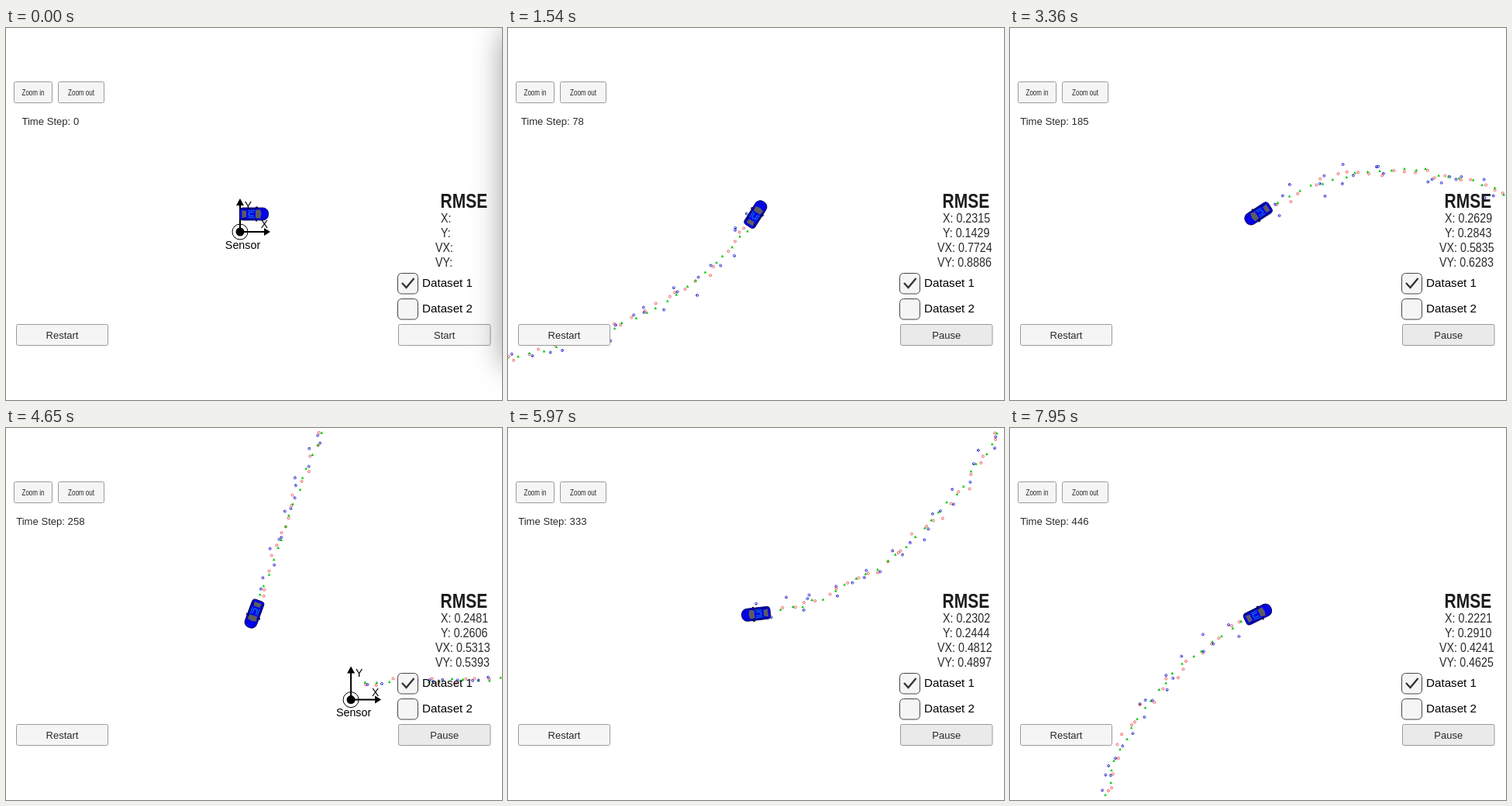
Write an HTML page with a canvas that moves like this. It is 640x480 px and loops after 7.99 s.

```html
<!DOCTYPE html>
<html lang="en">
<head>
<meta charset="utf-8">
<title>Sensor fusion simulator</title>
<style>
html, body { margin: 0; width: 100%; height: 100%; overflow: hidden; background: #fff; }
canvas { display: block; width: 640px; height: 480px; }
</style>
</head>
<body>
<canvas id="stage" width="640" height="480"></canvas>
<script>
const ctx = document.getElementById("stage").getContext("2d");
const LOOP = 7990, BEGIN = 140, TICK = 40.6;
const SCALE = 31, DT = 0.05, STEPS = 460;
const CX = 320, CY = 240;

// Readings along the run: time in ms, step, RMSE of x, y, vx, vy
const KEYS = [
  [140, 0, 0, 0, 0, 0],
  [1540, 78, 0.2315, 0.1429, 0.7724, 0.8886],
  [3360, 185, 0.2629, 0.2843, 0.5835, 0.6283],
  [4650, 258, 0.2481, 0.2606, 0.5313, 0.5393],
  [5970, 333, 0.2302, 0.2444, 0.4812, 0.4897],
  [7110, 398, 0.2214, 0.2470, 0.4446, 0.4767],
  [7950, 446, 0.2221, 0.2910, 0.4241, 0.4625]
];
// squared error built up before the filter settles
const FIRST_ERROR = [0, 0, 35, 45];

function randomFrom(seed) {
  return () => {
    seed = (seed + 0x6D2B79F5) | 0;
    let v = Math.imul(seed ^ (seed >>> 15), 1 | seed);
    v = (v + Math.imul(v ^ (v >>> 7), 61 | v)) ^ v;
    return ((v ^ (v >>> 14)) >>> 0) / 4294967296;
  };
}
const random = randomFrom(11);
const noise = sd => (random() + random() + random() - 1.5) * 2 * sd;

// Pixels relative to the sensor, y down; yaw swings out and back in 500 steps.
function buildTrack() {
  const track = [];
  let x = 18, y = -23, yaw = 0;
  for (let i = 0; i <= STEPS; i++) {
    track.push({ x, y, yaw });
    const phase = 2 * Math.PI * (i + 1) / 500;
    const dist = (5 + 0.2 * Math.cos(2 * phase)) * DT * SCALE;
    const turn = 0.55 * Math.sin(phase) * DT;
    x += dist * Math.cos(yaw + turn / 2);
    y -= dist * Math.sin(yaw + turn / 2);
    yaw += turn;
  }
  return track;
}
const track = buildTrack();

// Laser and radar readings alternate; radar is noisy in range and bearing.
function buildMarks() {
  const marks = [];
  const add = (kind, i, x, y) => marks.push({ kind, i, x, y, spin: random() * 6.28 });
  track.forEach(({ x, y }, i) => {
    if (i % 2) {
      const range = Math.hypot(x, y) + noise(6);
      const bearing = Math.atan2(y, x) + noise(0.02);
      add("radar", i, range * Math.cos(bearing), range * Math.sin(bearing));
    } else {
      add("laser", i, x + noise(3.8), y + noise(3.8));
      add("estimate", i, x + noise(1.5), y + noise(1.5));
    }
  });
  return marks;
}
const marks = buildMarks();

function segment(value, column) {
  let k = 0;
  while (k < KEYS.length - 2 && value >= KEYS[k + 1][column]) k++;
  return [KEYS[k], KEYS[k + 1]];
}

function stepAt(t) {
  if (t < BEGIN) return 0;
  const [[t0, n0], [t1, n1]] = segment(t, 0);
  const ticks = Math.round((t1 - t0) / TICK);
  const tick = Math.min(ticks, Math.floor((t - t0) / (t1 - t0) * ticks + 1e-6));
  return Math.max(1, Math.round(n0 + (n1 - n0) * tick / ticks));
}

function rmse(n, column) {
  const [a, b] = segment(n, 1);
  const total = key => key[1] ? key[column + 2] ** 2 * key[1] : FIRST_ERROR[column];
  const sum = total(a) + (total(b) - total(a)) * (n - a[1]) / (b[1] - a[1]);
  return Math.sqrt(sum / n).toFixed(4);
}

function text(str, x, y, size, { align = "left", color = "#2a2a2a", narrow = 1, weight = "" } = {}) {
  ctx.save();
  ctx.translate(x, y);
  ctx.scale(narrow, 1);
  ctx.font = `${weight} ${size}px "Liberation Sans", Arial, sans-serif`;
  ctx.textAlign = align;
  ctx.fillStyle = color;
  ctx.fillText(str, 0, 0);
  ctx.restore();
}

function box(x, y, w, h, r, fill, line) {
  ctx.beginPath();
  ctx.roundRect(x + 0.5, y + 0.5, w - 1, h - 1, r);
  ctx.fillStyle = fill;
  ctx.fill();
  ctx.strokeStyle = line;
  ctx.lineWidth = 1;
  ctx.stroke();
}

function shape(points, fill) {
  ctx.beginPath();
  points.forEach(([x, y]) => ctx.lineTo(x, y));
  ctx.closePath();
  ctx.fillStyle = fill;
  ctx.fill();
}

function stroke(points, color, width) {
  ctx.beginPath();
  points.forEach(([x, y]) => ctx.lineTo(x, y));
  ctx.strokeStyle = color;
  ctx.lineWidth = width;
  ctx.stroke();
}

function ring(x, y, r, color, width) {
  ctx.beginPath();
  ctx.arc(x, y, r, 0, 7);
  ctx.strokeStyle = color;
  ctx.lineWidth = width;
  ctx.stroke();
}

function drawMark({ kind, x, y, spin }) {
  if (kind === "estimate") {
    shape([[x, y - 1.8], [x + 1.8, y + 1.5], [x - 1.8, y + 1.5]], "#00c800");
  } else if (kind === "laser") {
    ring(x, y, 1.5, "#e62020", 0.7);
  } else {
    ring(x, y, 1.5, "#1010e0", 0.8);
    const c = Math.cos(spin) * 1.6, s = Math.sin(spin) * 1.6;
    stroke([[x, y], [x + c, y + s]], "#000050", 0.8);
  }
}

function drawSensor() {
  stroke([[0, 0], [0, -36]], "#000", 2);
  stroke([[0, 0], [33, 0]], "#000", 2);
  shape([[0, -43], [5, -34], [-5, -34]], "#000");
  shape([[39, 0], [31, -5], [31, 5]], "#000");
  ring(0, 0, 10, "#000", 1);
  ctx.beginPath();
  ctx.arc(0, 0, 5.5, 0, 7);
  ctx.fillStyle = "#000";
  ctx.fill();
}

function drawSensorLabels() {
  const black = { align: "center", color: "#000" };
  text("Sensor", 3.5, 21.5, 14.3, black);
  text("X", 31.5, -5, 14, black);
  text("Y", 10.5, -29.5, 14, black);
}

function drawCar(yaw) {
  ctx.save();
  ctx.translate(CX, CY);
  ctx.rotate(-yaw);
  shape([[2, -9.5], [5, -9.5], [4, 9.5], [2, 9.5]], "#000030");
  ctx.beginPath();
  ctx.roundRect(-18.5, -8, 37, 16, [4, 7, 7, 4]);
  ctx.fillStyle = "#0404ee";
  ctx.fill();
  ctx.strokeStyle = "#00004c";
  ctx.lineWidth = 0.9;
  ctx.stroke();
  for (const side of [-1, 1]) {
    stroke([[-16, 6 * side], [1, 6.4 * side], [9, 5.5 * side]], "#000050", 0.9);
    stroke([[11, 5.5 * side], [16, 4 * side]], "#0000a0", 0.8);
  }
  shape([[2, -5], [8, -6], [9.5, 0], [8, 6], [2, 5]], "#5c5c60");
  shape([[-15.5, -5], [-10, -4], [-10, 4], [-15.5, 5]], "#5c5c60");
  stroke([[1, -5], [-8, -4.5]], "#1480d8", 0.9);
  stroke([[1, 5], [-8, 4.5]], "#1480d8", 0.9);
  stroke([[0, -2.5], [-6, -2.5], [-7, 0], [-6, 2.5], [0, 2.5]], "#1480d8", 1.1);
  ctx.restore();
}

function button(label, x, y, w, h, { fill = "#f5f5f5", size = 13, narrow = 1 } = {}) {
  box(x, y, w, h, 2, fill, "#9a9a9a");
  text(label, x + w / 2, y + h / 2 + size * 0.36, size, { align: "center", narrow });
}

function drawPanel(n, running) {
  const small = { size: 11.5, narrow: 0.7 };
  button("Zoom in", 10, 69, 50, 28, small);
  button("Zoom out", 67, 69, 60, 28, small);
  button("Restart", 13, 382, 119, 28);
  button(running ? "Pause" : "Start", 506, 382, 119.5, 28, { fill: running ? "#eaeaea" : "#f5f5f5" });
  text("Time Step: " + n, 57.3, 124.6, 13.1, { align: "center" });

  text("RMSE", 560.5, 232, 25, { narrow: 0.84, weight: "bold", color: "#1c1c1c" });
  ["X", "Y", "VX", "VY"].forEach((name, i) => {
    const value = n ? ` ${rmse(n, i)}` : "";
    text(`${name}:${value}`, i < 2 ? 561 : 554, 251.3 + 19 * i, 17, { narrow: 0.84 });
  });

  [316, 349].forEach((y, i) => {
    box(505, y, 27, 27.5, 5, "#f5f5f5", "#444");
    text("Dataset " + (i + 1), 537, y + 18.3, 15.2, { color: "#000" });
  });
  stroke([[511, 329], [516.5, 335], [526.5, 323]], "#333", 2.3);
}

function drawEdgeShadow() {
  ctx.save();
  ctx.shadowColor = "rgba(0,0,0,0.4)";
  ctx.shadowBlur = 36;
  ctx.fillRect(641, 5, 200, 430);
  ctx.restore();
}

function inWorld(car, paint) {
  ctx.save();
  ctx.translate(CX - car.x, CY - car.y);
  paint();
  ctx.restore();
}

function draw(now) {
  const t = now % LOOP;
  const running = t >= BEGIN;
  const n = stepAt(t);
  const car = track[n ? n + 1 : 0];

  ctx.fillStyle = "#fff";
  ctx.fillRect(0, 0, 640, 480);
  inWorld(car, () => {
    if (running) marks.filter(mark => mark.i <= n).forEach(drawMark);
    drawSensor();
  });
  drawCar(car.yaw);
  inWorld(car, drawSensorLabels);
  drawPanel(n, running);
  if (!running) drawEdgeShadow();
}

const started = performance.now();
function loop() {
  draw(performance.now() - started);
  requestAnimationFrame(loop);
}
loop();
</script>
</body>
</html>
```
